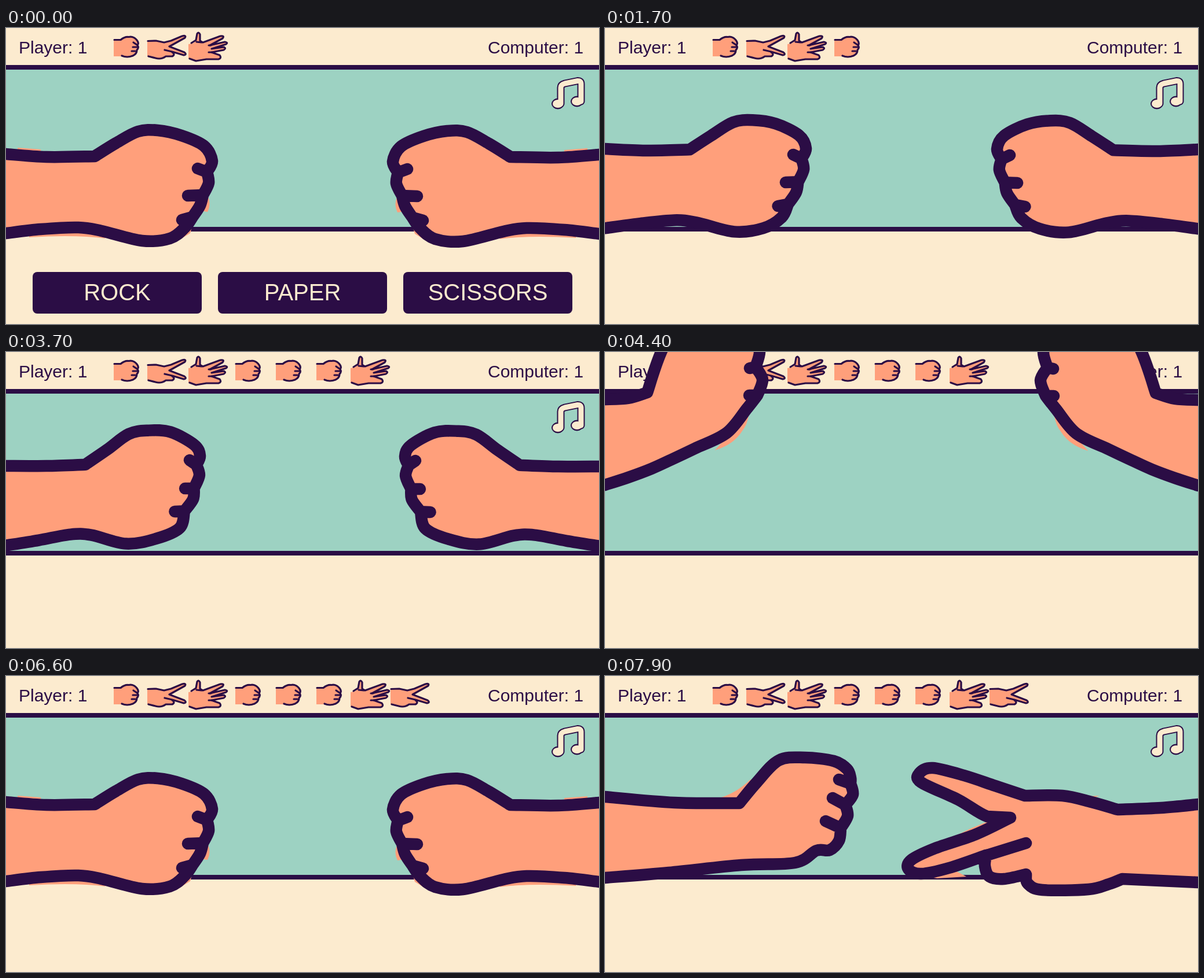
Write an HTML page that moves like this. It is 1024 px wide and 512 px high and loops after 8 s.

```html
<!DOCTYPE html>
<html lang="en">
<head>
<meta charset="utf-8">
<title>Rock, paper, scissors</title>
<style>
  html, body { margin: 0; width: 100%; height: 100%; overflow: hidden; background: #fcebcf; }
  svg { display: block; width: 100vw; height: 100vh; }
  text { font-family: "Liberation Sans", Arial, sans-serif; }
  .score { font-size: 30px; fill: #2b0d45; }
  .label { font-size: 40px; fill: #fcebcf; text-anchor: middle; }
  .ink { fill: none; stroke: #2b0d45; stroke-width: 20.5; stroke-linecap: round; stroke-linejoin: round; }
  .skin { fill: #ff9f7b; }
  .icon .line { fill: none; stroke: #2b0d45; stroke-width: 3.2; stroke-linecap: round; stroke-linejoin: round; }
</style>
</head>
<body>
<svg viewBox="0 0 1024 512" preserveAspectRatio="none">
  <defs>
    <g id="rock" class="icon">
      <path class="skin" d="M0 20H13Q20 14 27 15 41 16 43 28 43 42 34 47 24 52 13 49H0Z"/>
      <path class="line" d="M1 20.500H12Q19 14.500 26 15.500C33 14 38 18 40 21Q44 26 41 30 44 34 40 38 40 45 33 48 23 52 14 48"/>
      <path class="line" d="M34 25L40 29M33 33L40 33M31 40L37 40"/>
    </g>
    <g id="scissors" class="icon">
      <path class="skin" d="M-12 23L4 22 17 25 28 22 48 14Q56 13 52 18L25 33 52 43Q56 47 50 47L31 42 34 47Q31 51 20 50 12 56 2 53L-12 49Z"/>
      <path class="line" d="M-11 22.500L3 22 17 25 29 22 48 14Q56 12 53 17L26 32 52 42Q57 46 51 47L31 41 18 38M31 42Q37 46 31 49L20 49Q12 55 2 52L-10 49"/>
    </g>
    <g id="paper" class="icon">
      <path id="palm" class="skin" d="M-11 28L-2 26 3 20 4 10Q7 6 9 11L9 23 14 25 44 14Q52 13 48 18L26 30 52 24Q58 25 54 28L29 36 50 33Q55 35 50 38L29 42 43 47Q47 52 41 54L20 54 2 57-11 53Z"/>
      <path class="line" d="M-6 26L2 21 4 10Q7 6 9 11L9 22 14 25 44 14Q52 13 48 18L26 30 52 24Q58 25 54 28L29 36 50 33Q55 35 50 38L29 42 43 47Q47 52 41 54L20 54 2 57-9 53"/>
      <path class="line" d="M3 24L12 25M24 30L28 30M24 42L30 42"/>
    </g>
    <g id="word">
      <path d="M411 247L424 300M411 247Q449 239 448 268 446 294 424 300M466 235L476 292M466 235Q497 223 497 244 494 257 472 262L503 285"/>
      <path d="M521 284L529 222 542 220 556 277M525 262L549 256M566 211L577 264 587 228 598 260 609 202"/>
    </g>
  </defs>

  <rect width="1024" height="512" fill="#fcebcf"/>
  <rect y="68" width="1024" height="280" fill="#9dd2c2"/>
  <path d="M0 68H1024M0 348H1024" stroke="#2b0d45" stroke-width="8"/>
  <text class="score" x="22" y="44">Player: 1</text>
  <text class="score" x="832" y="44">Computer: 1</text>
  <g id="history"></g>

  <g stroke-linejoin="round" stroke-linecap="round">
    <g fill="#2b0d45" stroke="#2b0d45">
      <ellipse cx="953" cy="131" rx="10.500" ry="9"/><ellipse cx="986" cy="127" rx="10.500" ry="9"/>
      <path d="M958 131V103Q958 98 965 96L987 91.500Q993 91 993 97V127" fill="none" stroke-width="13"/>
    </g>
    <g fill="#fcebcf" stroke="#fcebcf" stroke-width="0">
      <ellipse cx="953" cy="131" rx="9" ry="7"/><ellipse cx="986" cy="127" rx="9" ry="7"/>
      <path d="M958 131V103Q958 98 965 96L987 91.500Q993 91 993 97V127" fill="none" stroke-width="9"/>
    </g>
  </g>

  <g id="left"></g>
  <g id="right" transform="translate(1024 1) scale(-1 1)"></g>
  <g id="buttons"></g>

  <g id="burst" stroke-linejoin="miter">
    <path d="M511 150L531 170 555 156 563 174 621 160 614 185 653 183 634 240 657 260 634 268 648 290 609 291 611 323 578 315 574 347 540 322 508 376 496 338 457 376 452 340 421 364 414 325 379 324 402 290 364 270 386 250 370 208 405 205 396 171 432 184 455 182 456 155 490 167Z" fill="#000" stroke="#000" stroke-width="5"/>
    <path d="M511 153L527 179 552 163 562 183 615 167 607 190 645 188 629 246 648 260 625 264 630 280 604 290 598 315 572 305 562 332 540 315 510 362 500 322 462 345 450 325 424 352 418 315 388 314 408 290 372 268 396 256 379 213 412 210 402 178 436 192 459 186 460 162 488 178Z" fill="#ff9f7b"/>
    <path d="M511 166L527 190 552 181 568 198 610 190 625 200 618 245 632 256 612 268 642 288 604 288 606 312 572 300 574 335 540 312 510 345 492 318 462 342 462 312 430 322 440 300 384 317 404 290 395 260 380 238 398 236 376 212 425 215 428 198 458 196 460 170 487 188Z" fill="#fdf4d6" stroke="#000" stroke-width="2.500"/>
    <path d="M420 340L430 322M476 338L494 320M566 302L567 330M548 188L549 193M383 212L412 216" stroke="#000" stroke-width="2.500" fill="none"/>
    <g fill="none">
      <use href="#word" stroke="#000" stroke-width="25" transform="translate(-2 3)"/>
      <use href="#word" stroke="#000" stroke-width="24"/>
      <use href="#word" stroke="#9dd2c2" stroke-width="15"/>
    </g>
  </g>
</svg>
<script>
const $ = id => document.getElementById(id);
const NS = "http://www.w3.org/2000/svg";

// Outline points; "/" marks a corner. Folds are short strokes between fingers.
const poses = {
  idle: {
    line: "0,218 70,223 153,222/190,199 228,179 262,177 303,186 342,204 356,230 347,249/350,268 340,289/335,307 322,327/309,345 283,364 235,368 165,351 125,345 60,348 0,355",
    folds: "331,243 347,249/314,290 340,289/304,332 322,327",
    spill: "M20 207L60 210V216H20ZM340 280Q358 298 348 318L335 316ZM40 362Q120 357 172 364L150 350H40ZM305 350L322 342 318 355 300 366Z"
  },
  lift: {
    line: "0,188 70,186 130,183/168,156 205,126 238,118 276,118 318,142 326,158 321,172/327,190 318,213/318,232 302,253/296,287 250,305 195,316 140,302 105,303 55,316 0,326",
    folds: "311,163 321,172/307,213 318,213/286,252 302,253",
    spill: "M334 165Q342 190 327 240 312 275 300 285L310 200ZM100 316L150 318 140 305ZM180 320Q250 322 304 290L240 300Z"
  },
  high: {
    line: "0,128 60,121 108,109/137,74 185,28 236,10 275,26 300,52 305,64 303,72/312,97 305,121/306,140 294,160/291,181 260,207 208,230 140,230 110,236 55,254 0,271",
    folds: "291,68 303,72/294,116 305,121/282,158 294,160",
    spill: "M106 92Q106 70 130 68L140 75 115 100Z"
  },
  top: {
    line: "0,82 40,80 73,70/97,0 140,-85 195,-115 240,-100 264,-75 268,-50 260,-24/267,0 260,26/272,48 263,75/245,98 210,140 155,167 115,186 80,202 40,217 0,230",
    folds: "245,-22 260,-24/250,28 260,26/249,75 263,75",
    spill: "M268 78Q260 95 248 110 246 125 236 138 222 160 190 170 170 174L160 165 250 80Z"
  },
  rock: {
    line: "0,209 120,219 232,220/262,184 300,146 345,141 395,147 418,161 424,176 424,186/428,205 415,223/419,242 407,263/404,285 388,301 365,302 328,323 235,327 110,340 0,349",
    folds: "404,179 424,186/393,211 415,223/381,251 407,263",
    spill: "M190 213Q225 205 252 178L240 215Z"
  },
  paper: {
    line: "0,225 60,226 108,224/150,190 195,145 228,110 238,76/247,68 261,82 259,115 236,164/290,161 350,143 415,126 445,130 444,151 400,177 350,193 292,202/370,206 440,190 472,203 464,224 390,242 305,255/385,256 450,246 476,262 455,280 370,289 278,305/300,322 370,320 410,328 430,346 415,356 340,354 280,353/190,354 110,345 60,345 0,350",
    folds: "192,170 265,168",
    spill: "M108 220Q190 118 225 76L240 85 150 200ZM390 126Q450 105 463 130 462 150 440 155L400 130ZM110 358L160 365 300 364 420 366V350H110Z"
  },
  scissors: {
    line: "0,221 64,227 139,230/184,217 234,206 299,206/350,189 404,171 458,158 481,167 478,183 414,213 364,242 324,244/384,273 454,297 495,317 500,333 478,341 430,331 366,309/368,328 360,346 335,350 297,342/294,358 269,369 189,368 154,359 131,350/0,356",
    folds: "364,242 324,244/374,312 297,288",
    spill: "M335 242Q395 258 454 297L380 285ZM170 206L205 208 200 216ZM400 346L450 349 478 345 430 330Z"
  }
};
const swing = [poses.idle, poses.lift, poses.high, poses.top];

const rounds = [
  { at: 600, peak: 1300, left: "rock", right: "rock" },
  { at: 3400, peak: 4400, left: "paper", right: "paper" },
  { at: 6600, peak: 7300, left: "rock", right: "scissors" }
];
const picks = [
  [0, "rock"], [0, "scissors"], [0, "paper"], [600, "rock"],
  [3400, "rock"], [3500, "rock"], [3700, "paper"], [6600, "scissors"]
];

const parse = s => s.split("/").map(part => part.split(" ").map(p => p.split(",").map(Number)));
const mix = (a, b, k) => {
  let i = 0;
  const nums = b.match(/-?\d+/g);
  return a.replace(/-?\d+/g, n => +n + (nums[i++] - n) * k);
};

// Smooth curve through the points of each run, starting where the last one ended.
function curve(text) {
  let d = "", last = null;
  for (const run of parse(text)) {
    const p = last ? [last, ...run] : run;
    if (!last) d = "M" + p[0];
    for (let i = 0; i < p.length - 1; i++) {
      const a = p[i - 1] || p[i], b = p[i], c = p[i + 1], e = p[i + 2] || c;
      const c1 = b.map((v, j) => v + (c[j] - a[j]) / 6);
      const c2 = c.map((v, j) => v - (e[j] - b[j]) / 6);
      d += `C${c1} ${c2} ${c}`;
    }
    last = p[p.length - 1];
  }
  return d;
}

function add(parent, tag, attrs, text) {
  const el = document.createElementNS(NS, tag);
  for (const k in attrs) el.setAttribute(k, attrs[k]);
  if (text) el.textContent = text;
  parent.appendChild(el);
  return el;
}

function makeHand(id) {
  const [spill, skin, ink] = ["skin", "skin", "ink"].map(c => add($(id), "path", { class: c }));
  return pose => {
    const d = curve(pose.line);
    const folds = parse(pose.folds).map(([a, b]) => `M${a}L${b}`).join("");
    spill.setAttribute("d", pose.spill);
    skin.setAttribute("d", d + "Z");
    ink.setAttribute("d", d + folds);
  };
}

function track(keys, x) {
  let i = 1;
  while (i < keys.length - 1 && x > keys[i][0]) i++;
  const [x0, y0] = keys[i - 1], [x1, y1] = keys[i];
  return y0 + (y1 - y0) * Math.min(1, (x - x0) / (x1 - x0));
}

function swingPose(level) {
  const i = Math.min(2, Math.floor(level)), k = level - i;
  const a = swing[i], b = swing[i + 1];
  return {
    line: mix(a.line, b.line, k),
    folds: mix(a.folds, b.folds, k),
    spill: k < 0.01 ? a.spill : k > 0.99 ? b.spill : ""
  };
}

const drawLeft = makeHand("left"), drawRight = makeHand("right");
const icons = picks.map(([at, kind], i) =>
  add($("history"), "use", { href: "#" + kind, x: 186 + 70 * i }));
["ROCK", "PAPER", "SCISSORS"].forEach((name, i) => {
  add($("buttons"), "rect", { x: 46 + 320 * i, y: 422, width: 292, height: 72, rx: 8, fill: "#2b0d45" });
  add($("buttons"), "text", { class: "label", x: 192 + 320 * i, y: 471 }, name);
});

const show = (el, on) => el.setAttribute("visibility", on ? "visible" : "hidden");
const rise = [[0, 0], [3 / 7, 1], [5 / 7, 2], [1, 3]];
const fall = [[0, 3], [200, 2], [300, 1], [400, 0.3]];

function draw(t) {
  const round = rounds.find(r => t >= r.at && t < r.peak + 1600);
  let left = poses.idle, right = poses.idle, playing = false, zoom = 0;
  if (round) {
    const since = t - round.peak;
    playing = since < 1300;
    if (since < 500) {
      left = right = swingPose(since < 0
        ? track(rise, (t - round.at) / (round.peak - round.at))
        : track(fall, since));
    } else if (playing) {
      left = poses[round.left];
      right = poses[round.right];
    }
    if (since >= 1000) zoom = track([[1000, 2], [1200, 1]], since);
  }
  drawLeft(left);
  drawRight(right);
  show($("buttons"), !playing);
  show($("burst"), zoom > 0);
  $("burst").setAttribute("transform", `translate(511 262) scale(${zoom || 1}) translate(-511 -262)`);
  icons.forEach((el, i) => show(el, t >= picks[i][0]));
}

const start = performance.now();
let shown = -1;
function tick() {
  const t = Math.floor((performance.now() - start) % 8000 / 100) * 100;
  if (t !== shown) draw(shown = t);
  requestAnimationFrame(tick);
}
tick();
</script>
</body>
</html>
```
